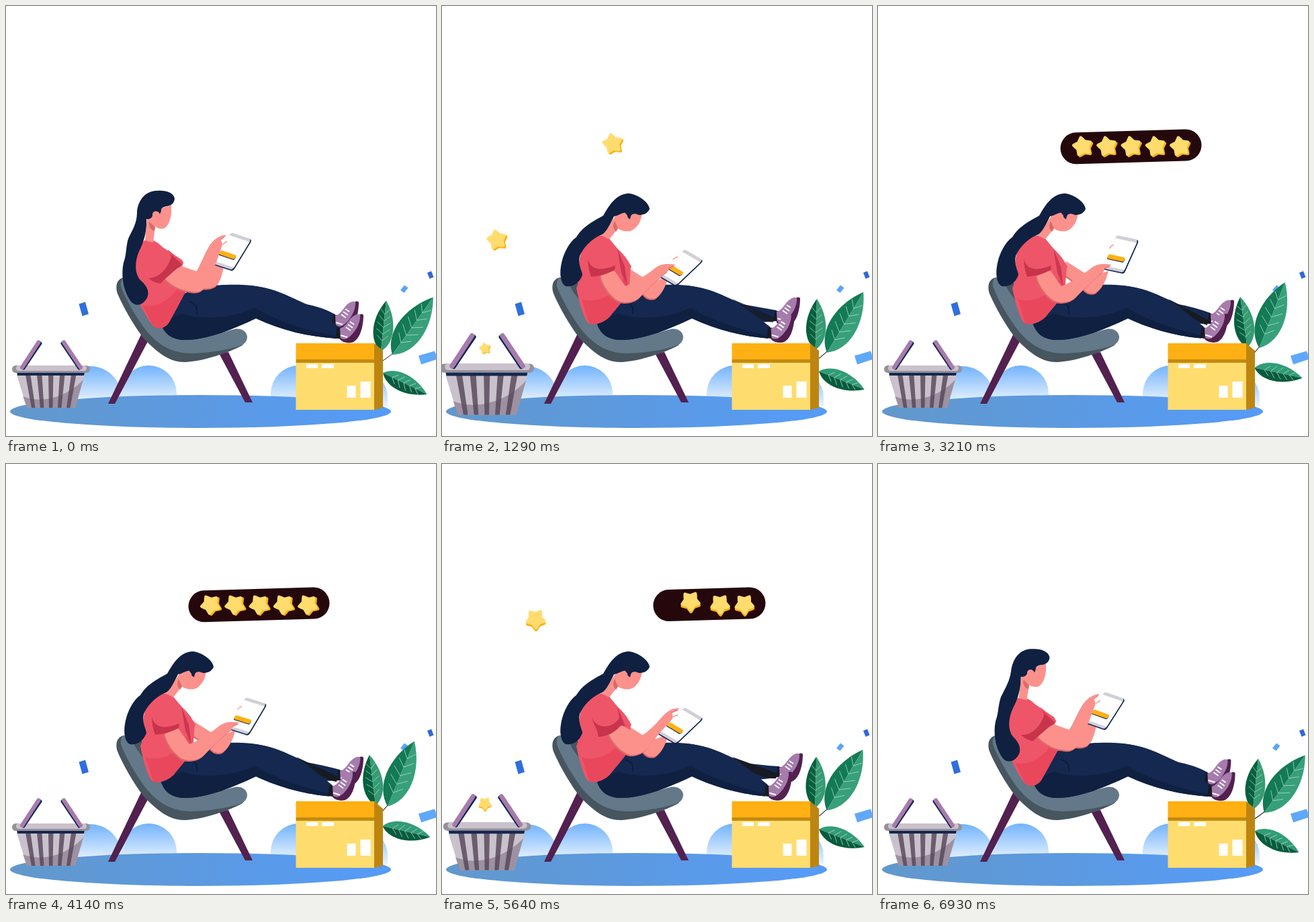
Recreate the animation shown at these times as an HTML page. Size 640x640 px, loop 7 s.

```html
<!DOCTYPE html>
<html lang="en">
<head>
<meta charset="utf-8">
<title>Rating from a chair</title>
<style>
html,body{margin:0;width:100%;height:100%;overflow:hidden;background:#fff}
svg{display:block;width:100vw;height:100vh}
</style>
</head>
<body>
<svg viewBox="0 0 640 640">
<defs>
  <linearGradient id="ground"><stop stop-color="#6298cb"/><stop offset="1" stop-color="#559bf8"/></linearGradient>
  <linearGradient id="cloud" x2="0" y2="1"><stop stop-color="#72b3fc"/><stop offset="1" stop-color="#eaf4ff"/></linearGradient>
  <g id="shoe">
    <path fill="#52214f" d="M0 9C4 14 14 16 20 13C30 8 35-10 35-27C33-30 29-28 27-26L0-5Z"/>
    <path fill="#a67cad" d="M0-7C7-8 12-18 16-22C21-27 27-30 30-27C31-14 21 1 12 7C8 10 3 9 1 7Z"/>
    <path stroke="#fff" stroke-width="2" fill="none" d="M9-9l7 5M12-13l7 5M15-17l6 4M1 3l10 3"/>
  </g>
</defs>
<g fill="url(#cloud)">
  <path d="M78 590V583a47 47 0 0 1 94 0V590Z"/>
  <path d="M171 590V577a41.500 42 0 0 1 83 0V590Z"/>
  <path d="M394 590V577a42 42 0 0 1 84 0V590Z"/>
  <path d="M484 596V583a42 42 0 0 1 84 0V596Z"/>
</g>
<ellipse cx="289.500" cy="603.500" rx="283.500" ry="24.500" fill="url(#ground)"/>
<path fill="#2f6fdd" d="M108.500 443.500l9.500-3 5 18-9.500 3z"/>
<path fill="#3068d8" d="M627 397l6-2.500 3.500 9-6 2.500z"/>
<path fill="#5ba4f8" d="M587 423l6-7.500 5.500 4-6 7.500z"/>
<path fill="#5fa8fb" d="M614 520.500l24-7 4 12-24 8z"/>
<g id="plant"><path d="M556 531Q566 525 576 517" stroke="#222" fill="none"/></g>
<path fill="#ffdc6e" d="M431.500 528h117v73h-117z"/>
<path fill="#ffb013" d="M431.500 502h117v25h-117z"/>
<path fill="#c28a12" d="M431.500 526h117v5h-117z"/>
<path fill="#bd8510" d="M548 502l13 11v85l-13 3z"/>
<path fill="#fff" d="M447 533h17v6h-17zM470 533h18v6h-18zM507.500 565h13v18h-13zM527.500 559h15v24h-15z"/>
<path fill="#52214f" d="M152 592h10L216 490 203 485ZM317 517L331 515 367 590H356Z"/>
<path fill="#47555f" d="M175 404C163 407 163 420 166 428C175 450 195 483 207 497C225 515 243 531 268 530C300 528 340 512 352 505L358 495L300 480L200 410Z"/>
<path fill="#637889" d="M175 404C170 408 170 415 172 420C180 441 200 473 212 487C230 507 250 517 275 517C300 517 335 511 350 505C357 502 359 497 359 492C358 484 350 479 340 481C325 484 300 495 270 496L235 480L195 425C190 415 183 405 175 404Z"/>
<path id="backLeg" fill="#142850"/>
<path id="gap" fill="#171a20"/>
<path id="backSock" stroke="#171a20" stroke-width="7"/>
<use id="backShoe" href="#shoe"/>
<path id="frontLeg" fill="#142850"/>
<path id="legShade" fill="#0f2041"/>
<path id="frontSock" stroke="#171a20" stroke-width="7"/>
<use id="frontShoe" href="#shoe"/>
<path d="M272 440Q286 443 284 458" stroke="#0c1a36" stroke-width="1.500" fill="none"/>
<g id="farArm"><path id="farShade" fill="#dc6a6a" transform="translate(-1 2)"/><path id="farSkin" fill="#fc918c"/></g>
<path id="farSleeve" fill="#cb3650"/>
<path id="shirt" fill="#ef5568"/>
<path id="shirtLow" fill="#e9485c"/>
<path id="farFold" fill="#cb3650"/>
<path id="face" fill="#fc918c"/>
<path id="neckShade" fill="#dc6a6a"/>
<path id="hair" fill="#0f2041"/>
<circle id="ear" r="5.200" fill="#fc918c"/>
<g id="tablet">
  <rect x="2" y="1" width="104" height="102" rx="9" fill="#142850"/>
  <rect width="100" height="100" rx="9" fill="#d2cfd7"/>
  <path d="M0 9H100V92H0Z" fill="#fff"/>
  <rect x="4" y="60" width="78" height="12" rx="5" fill="#142850"/>
  <rect x="3" y="57" width="78" height="13" rx="6" fill="#ffb013"/>
  <path d="M6 28Q-2 32-4 41" fill="none" stroke="#fc918c" stroke-width="4"/>
</g>
<path id="armShade" fill="#dc6a6a" transform="translate(-1.500 2)"/>
<path id="arm" fill="#fc918c"/>
<path id="fold" fill="#c7344c"/>
<path id="pill" stroke="#25080c" stroke-linecap="round"/>
<g id="stars"></g>
<g id="basket">
  <path fill="#c9c2cc" d="M16 549H117L103 598H31Z"/>
  <path id="slats" fill="#6b5d6d"/>
  <path fill="#55425a" fill-opacity=".38" d="M25 581C58 594 95 578 115 556L103 598H31Z"/>
  <path fill="#142850" d="M16 545H117L116 550H17Z"/>
  <rect x="9" y="535" width="116" height="11" rx="5.500" fill="#96909a"/>
  <rect x="15" y="535" width="105" height="8" rx="4" fill="#c9c2cc"/>
  <g stroke-linecap="round">
    <path stroke="#142850" stroke-width="5" d="M26 539L51 502M109 539L84 502"/>
    <path stroke="#a77bad" stroke-width="6" d="M24 538L48.500 500.500M111 538L86 500.500"/>
  </g>
</g>
</svg>
<script>
const LOOP = 7000;
const $ = id => document.getElementById(id);
const set = (id, name, value) => $(id).setAttribute(name, value);
const lerp = (a, b, t) => a + (b - a) * t;
const progress = (t, from, to) => Math.max(0, Math.min(1, (t - from) / (to - from)));
const ease = (t, from, to) => { const u = progress(t, from, to); return u * u * (3 - 2 * u); };
const easeCubic = (t, from, to) => {
  const u = progress(t, from, to);
  return u < .5 ? 4 * u ** 3 : 1 - 4 * (1 - u) ** 3;
};
// Rises over a..b, holds, falls over c..d.
const hump = (t, a, b, c, d, curve = ease) => curve(t, a, b) - curve(t, c, d);
const NUM = /-?\d*\.?\d+/g;
const mix = (a, b, t) => {
  const other = b.match(NUM);
  let i = 0;
  return a.replace(NUM, n => lerp(+n, +other[i++], t).toFixed(3));
};

// Each part: sitting back, leaning forward.
const body = {
  shirt: ['M206 349C213 345 225 350 233 359L262 378C266 383 262 390 256 394L268 424C262 435 250 458 242 472C236 480 226 482 219 476C212 468 205 455 200 445C195 420 190 390 194 375C197 362 200 354 206 349Z',
    'M217 349C226 343 240 338 247 344L262 362C272 371 278 380 281 387L278 427C270 438 258 452 250 462C242 470 232 475 219 473C212 468 205 445 200 420C207 405 202 390 205 375C208 362 211 354 217 349Z'],
  shirtLow: ['M203 445C222 452 250 435 257 415L268 424C262 435 250 458 242 472C236 480 226 482 219 476Z',
    'M208 436C228 444 262 430 272 400L278 427C270 438 258 452 250 462C242 470 232 475 219 473Z'],
  farSleeve: ['M240 362L264 382L258 392L248 375Z', 'M258 358L282 388L274 397L266 380Z'],
  farFold: ['M243 367L262 384L257 392L252 384Z', 'M261 361L272 388L276 417L267 397Z'],
  face: ['M212 308L246 296C247 312 244 324 237 330C231 333 225 331 222 328L219 352L207 349L210 316Z',
    'M262 305L298 308C297 320 290 332 280 335C272 336 265 334 262 331L249 347L238 342L257 314Z'],
  neckShade: ['M213 321L222 329L221 335C215 333 212 328 213 321Z', 'M257 320L262 331L259 336C254 331 254 326 257 320Z'],
  hair: ['M225 275C238 274 250 278 251 287C250 294 246 297 239 298C234 299 230 301 231 305L229 310C227 304 218 304 218 311C218 315 214 318 209 317C210 335 205 352 198 365C190 385 193 400 200 408C212 418 214 428 209 436C203 446 193 447 187 441C174 425 171 400 175 382C180 370 178 352 184 342C193 325 195 318 195 305C198 285 210 275 225 275Z',
    'M278 279C290 280 308 291 309 302C306 309 300 311 293 311C287 308 282 309 281 313L280 317C277 317 276 313 273 308C268 307 264 312 256 313C248 330 241 341 236 341C222 347 210 360 205 372C202 385 208 393 209 400C205 412 195 419 184 417C175 412 175 395 178 382C181 368 189 352 200 344C208 331 218 324 240 312C249 296 260 279 278 279Z'],
  farSkin: ['M270 395L296 400L309 384L324 388C322 400 318 412 312 417C303 422 292 421 285 418L270 405Z',
    'M274 388L301 405L319 409L337 402C334 415 328 428 318 435C308 438 302 432 299 428L268 405Z']
};
// Each limb: sitting back, leaning with hand raised, leaning with hand lowered.
const limbs = {
  arm: ['M234 403L261 387L284 395C292 382 298 365 305 354C312 345 322 340 328 341L319 348C323 352 322 357 320 361C314 380 306 400 299 413C295 425 285 427 276 425C258 423 244 415 234 403Z',
    'M247 400L268 389L297 405C308 397 318 388 327 377C336 367 345 362 354 364L341 370C345 374 344 378 341 381C330 393 318 406 310 418C302 430 290 434 280 433C265 428 255 416 247 400Z',
    'M236 402L256 393L273 417C288 411 305 400 316 391C325 383 337 383 348 385L337 390C338 393 336 396 332 398C318 410 303 424 295 433C286 442 270 443 261 438C249 430 240 417 236 402Z'],
  fold: ['M212 405C225 405 240 395 247 370L258 388C248 396 235 408 230 413C222 412 216 409 212 405Z',
    'M223 378C232 396 254 394 265 377L268 387C260 398 246 406 232 406C234 400 225 386 223 378Z',
    'M217 376C221 395 240 394 258 386L257 393C245 399 235 402 222 403C219 395 217 385 217 376Z']
};
const tabletPose = {
  back: 'matrix(.30 .10 -.28 .46 335 337)',
  low: 'matrix(.27 .16 -.40 .38 361 362)',
  high: 'matrix(.32 .07 -.22 .49 355 341)'
};

function addLeaf(x, y, angle, len, half, left, right) {
  const side = s => `M0 0C${len * .2} ${s * half * 1.4} ${len * .65} ${s * half * 1.3} ${len} 0Z`;
  let veins = '';
  for (let i = 1; i < 6; i++) {
    const at = len * (.08 + i * .13), reach = half * (.75 - Math.abs(i - 2.5) * .12);
    veins += `M${at} 0l${len * .1} ${-reach}M${at} 0l${len * .1} ${reach}`;
  }
  $('plant').insertAdjacentHTML('beforeend', `<g transform="translate(${x} ${y}) rotate(${angle})">
    <path fill="${left}" d="${side(-1)}"/><path fill="${right}" d="${side(1)}"/>
    <path d="${veins}" fill="none" stroke="#b9dccb" stroke-width=".7"/></g>`);
}
addLeaf(575, 519, -54.6, 105, 20, '#137a56', '#37a07a');
addLeaf(558, 514, -84, 76, 14.5, '#04603f', '#379b74');
addLeaf(561, 546, 26, 73, 13, '#319c77', '#075c3e');

let slats = '';
for (let i = -2; i <= 2; i++) {
  slats += `M${63 + i * 17} 549h7.500L${69.5 + i * 13} 598h-5.500Z`;
}
set('slats', 'd', slats);

const starPoints = Array.from({ length: 10 }, (_, i) => {
  const r = i % 2 ? 8 : 13.2, a = Math.PI * (.5 + i / 5);
  return `${(r * Math.cos(a)).toFixed(2)},${(r * Math.sin(a)).toFixed(2)}`;
}).join(' ');
const starPart = (color, y) =>
  `<polygon points="${starPoints}" transform="translate(0 ${y})" fill="${color}" stroke="${color}" stroke-width="4.500" stroke-linejoin="round"/>`;
$('stars').innerHTML = `<g>${starPart('#fcb116', 2)}${starPart('#ffdc6e', -1)}</g>`.repeat(5);
const stars = [...$('stars').children];

const cubic = (a, b, c, d, s) => {
  const q = 1 - s;
  return q * q * q * a + 3 * q * q * s * b + 3 * q * s * s * c + s * s * s * d;
};

function drawStars(t) {
  const gap = 232;
  const spin = -36 * (1 - Math.cos(2 * Math.PI * (t - 2250) / 3200));
  stars.forEach((star, i) => {
    const out = 745 + gap * i, home = 5078 + gap * i;
    const s = hump(t, out, out + 800, home, home + 660, easeCubic);
    const lift = t > 5000 ? 9 * i : 0;
    const x = cubic(64, 60 + 2 * i, 170 + 8 * i, 305 + 36.3 * i, s);
    const y = cubic(514, 300 - 55 * i - lift, 180 - 34 * i - lift, 209.5, s);
    const size = Math.min(1, .63 + s * 1.5) * Math.min(1, s * 200);
    star.setAttribute('transform', `translate(${x} ${y}) rotate(${spin}) scale(${size})`);
  });
}

function drawPill(t) {
  const x1 = lerp(295, 458, ease(t, 5285, 6345));
  const x2 = lerp(295, 458, ease(t, 1300, 2313));
  const y = x => 211.8 - (x - 295) * .029;
  const width = 47 * hump(t, 1300, 1430, 6240, 6400);
  set('pill', 'd', `M${x1} ${y(x1)}L${x2 + .01} ${y(x2)}`);
  set('pill', 'stroke-width', width);
  set('pill', 'visibility', width > 0 ? 'visible' : 'hidden');
}

function drawLegs(t, lift) {
  const g = hump(t, 0, 2100, 5900, 7060);
  const bx = lerp(490, 502, g) - 7 * lift, by = lerp(468, 459, g) + 7 * lift;
  const fx = lerp(497, 486, g), fy = lerp(487, 486.5, g);
  const hem = `${fx - 5} ${fy + 8}`;
  set('backLeg', 'd', `M360 416C400 418 425 435 448 444Q470 448 ${bx} ${by - 9}L${bx - 2} ${by + 7}C460 474 420 468 380 455Z`);
  set('gap', 'd', `M432 436L${bx - 4} ${by + 1}L${bx - 5} ${by + 9}Q470 470 432 436`);
  set('gap', 'opacity', g);
  set('frontLeg', 'd', `M262 430C285 416 320 414 352 415C395 417 420 432 440 441L${fx - 1} ${fy - 9}L${hem}C450 492 410 483 372 465C340 480 300 497 268 497C245 497 236 487 231 474Z`);
  set('legShade', 'd', `M231 474C236 487 245 497 268 497C300 497 340 480 372 465C410 483 450 492 ${hem}L${fx - 4} ${fy + 4}C450 484 400 468 370 449C345 462 300 470 262 458C250 462 240 468 231 474Z`);
  set('backSock', 'd', `M${bx + 1} ${by - 8}L${bx - 1} ${by + 7}`);
  set('frontSock', 'd', `M${fx - 1} ${fy - 8}L${fx - 3} ${fy + 8}`);
  set('backShoe', 'transform', `translate(${bx} ${by})`);
  set('frontShoe', 'transform', `translate(${fx} ${fy})`);
}

function drawBody(t, lift) {
  const lean = hump(t, 0, 780, 6300, 7060);
  const raised = 1 - hump(t, 800, 1230, 5050, 5550);
  for (const id in body) set(id, 'd', mix(...body[id], lean));
  for (const id in limbs) {
    const [back, up, down] = limbs[id];
    set(id, 'd', mix(back, mix(down, up, raised), lean));
  }
  set('armShade', 'd', $('arm').getAttribute('d'));
  set('farShade', 'd', $('farSkin').getAttribute('d'));
  set('farArm', 'transform', `translate(${6 * lift} ${-8 * lift})`);
  set('ear', 'cx', lerp(223.5, 271, lean));
  set('ear', 'cy', lerp(311, 314, lean));
  set('tablet', 'transform', mix(tabletPose.back, mix(tabletPose.low, tabletPose.high, lift), lean));
}

function draw(t) {
  const sway = (1 - Math.cos(2 * Math.PI * t / LOOP)) / 2;
  const lift = hump(t, 2200, 3100, 3600, 5100);
  const swell = 1 + .26 * hump(t, 760, 1500, 1500, 2600) + .31 * hump(t, 5400, 5950, 6250, 6850);
  set('plant', 'transform', `rotate(${-14.2 * sway} 530 545)`);
  set('basket', 'transform', `translate(67 547.5) scale(${swell}) translate(-67 -547.5)`);
  drawLegs(t, lift);
  drawBody(t, lift);
  drawPill(t);
  drawStars(t);
}

const start = performance.now();
function tick() {
  draw((performance.now() - start) % LOOP);
  requestAnimationFrame(tick);
}
tick();
</script>
</body>
</html>
```
